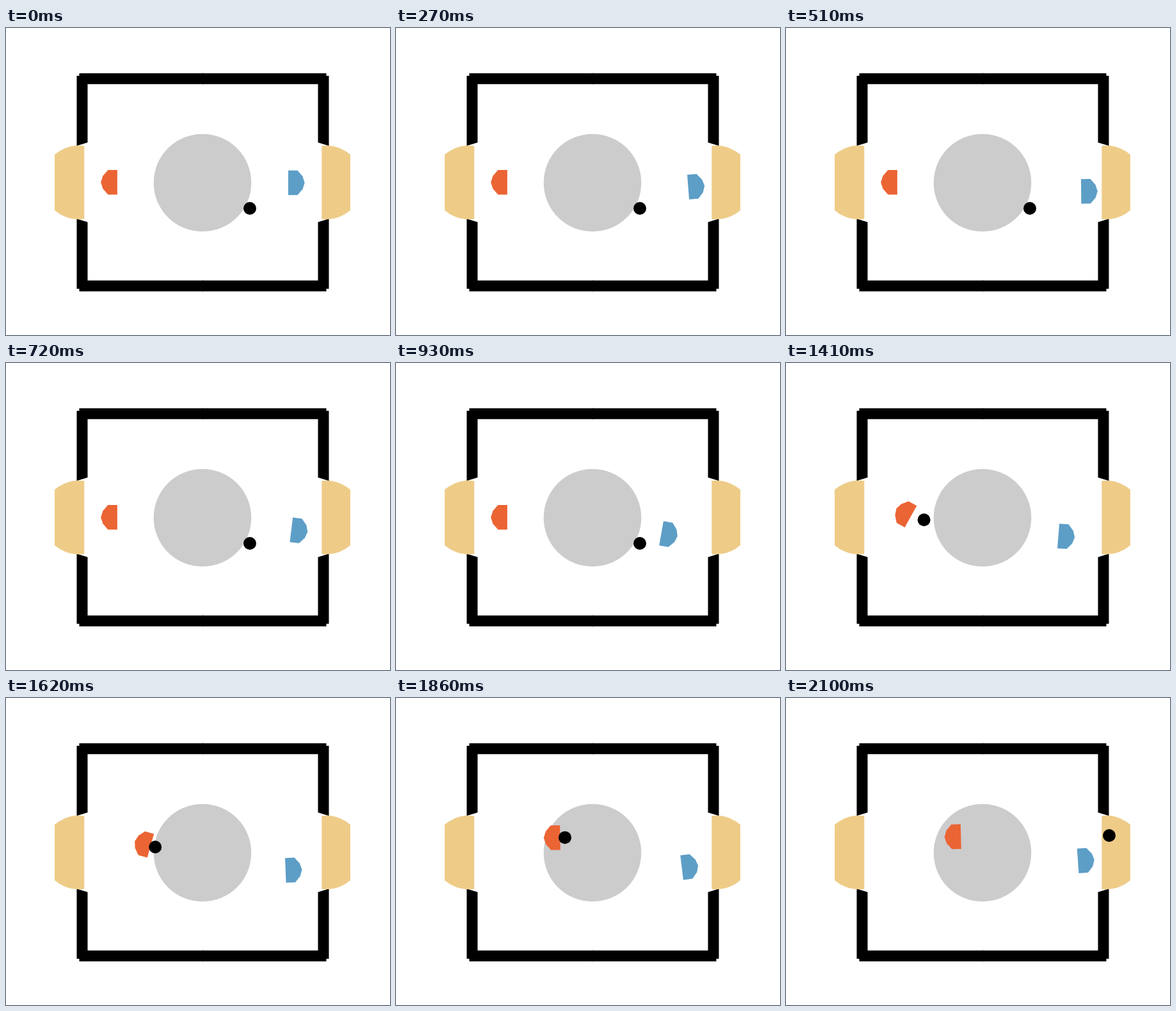
Write an HTML page with a canvas that moves like this. It is 600x480 px and loops after 2130 ms.

```html
<!DOCTYPE html>
<html lang="en">
<head>
<meta charset="utf-8">
<title>Table match</title>
<style>
html, body { margin: 0; width: 100%; height: 100%; overflow: hidden; background: #fff; }
canvas { display: block; }
</style>
</head>
<body>
<canvas id="stage" width="600" height="480"></canvas>
<script>
const ctx = document.getElementById('stage').getContext('2d');
const LOOP = 2130, STEP = 30;
const GRAB = 1110, HELD = 1170, SHOT = 1200, CATCH = 1425, FINAL_SHOT = 1860, GOAL = 2100;
const REST = [381, 282], IN_GOAL = [505, 215];

// Each pose: time, x, y, turn in degrees
const blue = {
  color: '#5d9ec7', face: -1, reach: 22.4,
  poses: [
    [0, 453.5, 242, 0],
    [270, 469, 247.7, -4.4],
    [530, 473.7, 256, 0],
    [720, 458.2, 262.3, 7],
    [1150, 404.5, 271.9, 11.5],
    [1410, 438, 271.4, 4.5],
    [1860, 459, 263.7, -7],
    [2100, 468.6, 254, -4]
  ]
};
const red = {
  color: '#eb6434', face: 1, reach: 20,
  poses: [
    [930, 161.4, 241.3, 0],
    [1230, 161.4, 231.8, 0],
    [1410, 184, 234, 29],
    [1860, 244, 218.5, -1],
    [2100, 260.8, 216.9, -1.4]
  ]
};

const mix = (a, b, u) => a.map((v, i) => v + (b[i] - v) * u);

// Smooth value through keyed rows, without overshoot
function follow(rows, c, t) {
  const last = rows.length - 1;
  if (t <= rows[0][0]) return rows[0][c];
  if (t >= rows[last][0]) return rows[last][c];
  const rate = i => (rows[i + 1][c] - rows[i][c]) / (rows[i + 1][0] - rows[i][0]);
  const slope = i => {
    const a = rate(Math.max(i - 1, 0)), b = rate(Math.min(i, last - 1));
    return a * b <= 0 ? 0 : 2 * a * b / (a + b);
  };
  const i = rows.findIndex(r => r[0] > t) - 1;
  const d = rows[i + 1][0] - rows[i][0], u = (t - rows[i][0]) / d, w = 1 - u;
  return w * w * (1 + 2 * u) * rows[i][c] + u * u * (3 - 2 * u) * rows[i + 1][c] +
    d * u * w * (w * slope(i) - u * slope(i + 1));
}

function pose(p, t) {
  const [x, y, turn] = [1, 2, 3].map(c => follow(p.poses, c, t));
  return { x, y, angle: turn * Math.PI / 180 };
}

// Point where a player holds the ball
function hold(p, t) {
  const { x, y, angle } = pose(p, t), r = p.face * p.reach;
  return [x + r * Math.cos(angle), y + r * Math.sin(angle)];
}

function ballAt(t) {
  const part = (a, b) => (t - a) / (b - a);
  if (t < GRAB) return REST;
  if (t < HELD) return mix(REST, hold(blue, t), part(GRAB, HELD));
  if (t < SHOT) return hold(blue, t);
  if (t < CATCH) return mix(hold(blue, SHOT), hold(red, CATCH), part(SHOT, CATCH));
  if (t < FINAL_SHOT) return hold(red, t);
  return mix(hold(red, FINAL_SHOT), IN_GOAL, part(FINAL_SHOT, GOAL));
}

function poly(color, points) {
  ctx.fillStyle = color;
  ctx.beginPath();
  points.forEach(([x, y]) => ctx.lineTo(x, y));
  ctx.fill();
}

function disc(color, x, y, r) {
  ctx.fillStyle = color;
  ctx.beginPath();
  ctx.arc(x, y, r, 0, 7);
  ctx.fill();
}

function goal(left, width, cx) {
  ctx.save();
  ctx.beginPath();
  ctx.rect(left, 180, width, 124);
  ctx.clip();
  disc('#eecc88', cx, 241.5, 57.7);
  ctx.restore();
}

// One quarter of the wall, mirrored about the middle of the field
function corner(sx, sy) {
  ctx.save();
  ctx.translate(307.5, 241.2);
  ctx.scale(sx, sy);
  poly('#000', [[-1, -170.5], [193, -170.5], [193, -166.5], [197, -166.5],
    [197, -57], [180, -62.3], [180, -153.5], [-1, -153.5]]);
  ctx.restore();
}

function field() {
  ctx.fillStyle = '#fff';
  ctx.fillRect(0, 0, 600, 480);
  for (const sx of [-1, 1]) for (const sy of [-1, 1]) corner(sx, sy);
  goal(76, 46.3, 114);
  goal(493.3, 44.7, 500);
  disc('#ccc', 307, 242, 76.3);
}

function player(p, t) {
  const { x, y, angle } = pose(p, t);
  ctx.save();
  ctx.translate(x, y);
  ctx.rotate(angle);
  ctx.scale(p.face, 1);
  poly(p.color, [[12.5, -19.3], [-2, -19.3], [-10, -10], [-13.2, 0],
    [-10, 10], [-2, 19.3], [12.5, 19.3]]);
  ctx.restore();
}

function draw(t) {
  field();
  player(red, t);
  player(blue, t);
  disc('#000', ...ballAt(t), 10);
}

let start;
function tick(now) {
  if (start === undefined) start = now;
  draw(Math.floor((now - start) % LOOP / STEP) * STEP);
  requestAnimationFrame(tick);
}
draw(0);
requestAnimationFrame(tick);
</script>
</body>
</html>
```
